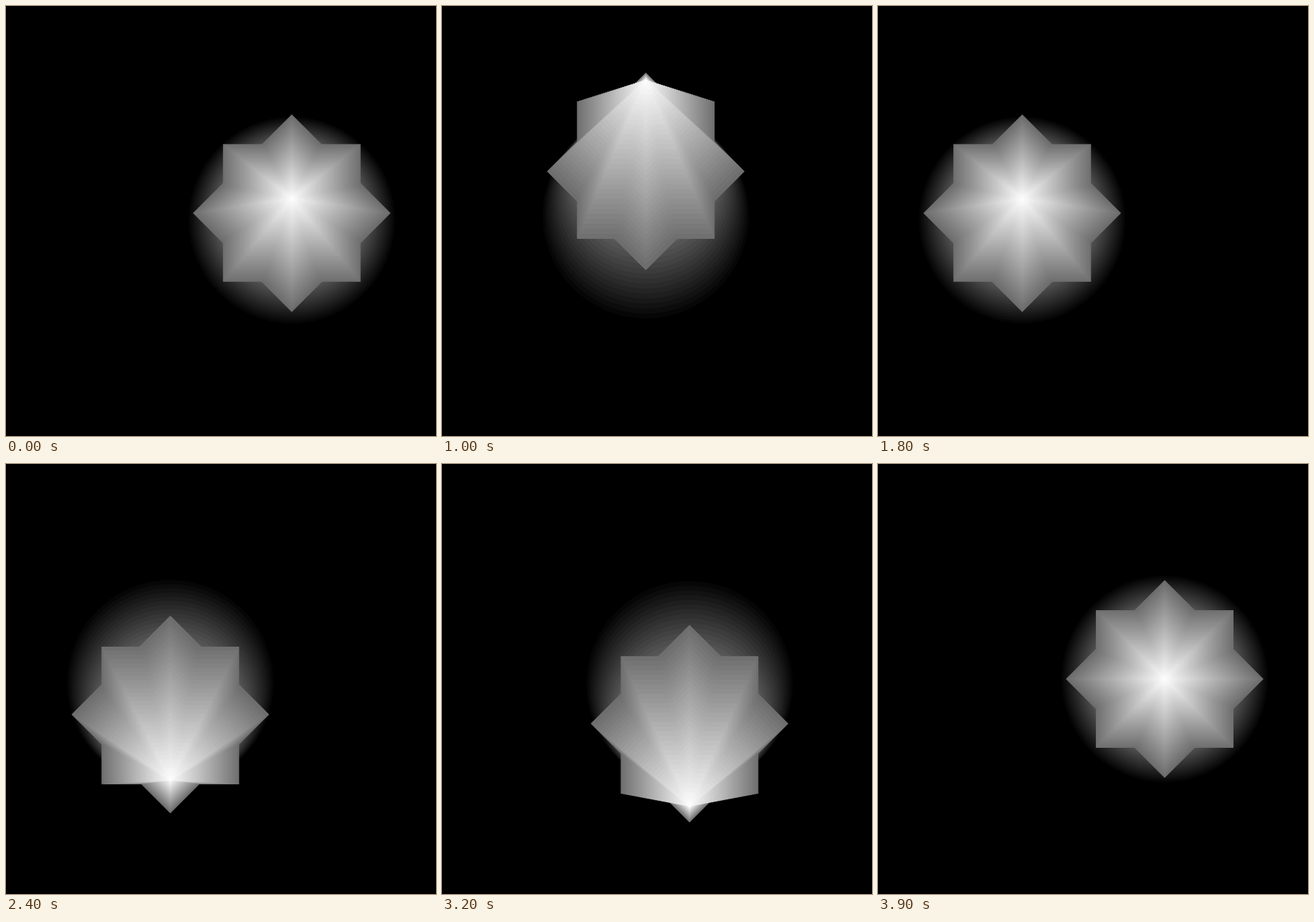
An HTML page with a canvas that plays this animation: 600x600 px, repeating every 4 s.

```html
<!DOCTYPE html>
<html lang="en">
<head>
<meta charset="utf-8">
<title>Orbiting star cone</title>
<style>
  html, body { margin: 0; width: 100%; height: 100%; overflow: hidden; background: #000; }
  canvas { display: block; }
</style>
</head>
<body>
<canvas id="stage" width="600" height="600"></canvas>
<script>
const ctx = document.getElementById('stage').getContext('2d');
const STEPS = 40, STEP_MS = 100;
const BASE = 150, SWAY_X = 100, SWAY_Y = 200;
const STAR_START = 35;

const discGray = depth => 300 * (depth - 0.02);
const starGray = depth => 110 + 145 * (depth - 0.35) / 0.65;

function fillGray(value) {
  const g = Math.round(value);
  ctx.fillStyle = `rgb(${g},${g},${g})`;
}

function disc(x, y, r) {
  ctx.beginPath();
  ctx.arc(x, y, r, 0, 2 * Math.PI);
  ctx.fill();
}

function square(x, y, half) {
  ctx.fillRect(x - half, y - half, 2 * half, 2 * half);
}

function diamond(x, y, half) {
  const r = half * Math.SQRT2;
  ctx.beginPath();
  ctx.moveTo(x, y - r);
  ctx.lineTo(x + r, y);
  ctx.lineTo(x, y + r);
  ctx.lineTo(x - r, y);
  ctx.fill();
}

// Layers shrink toward the tip, which sways further than the base.
function draw(step) {
  const angle = 2 * Math.PI * (step + 1) / STEPS;
  const x = 300 + SWAY_X * Math.cos(angle);
  ctx.fillStyle = '#000';
  ctx.fillRect(0, 0, 600, 600);

  for (let i = 4; i < 100; i++) {
    const depth = i / 100;
    const size = BASE * (1 - depth);
    const y = 300 - SWAY_Y * depth * Math.sin(angle);
    const even = i % 2 === 0;
    if (i >= STAR_START) {
      fillGray(starGray(depth));
      (even ? square : diamond)(x, y, size);
    } else if (even) {
      fillGray(discGray(depth));
      disc(x, y, size);
    }
  }
}

const start = performance.now();
function tick() {
  const elapsed = performance.now() - start;
  draw(Math.floor(elapsed / STEP_MS) % STEPS);
  requestAnimationFrame(tick);
}
tick();
</script>
</body>
</html>
```
